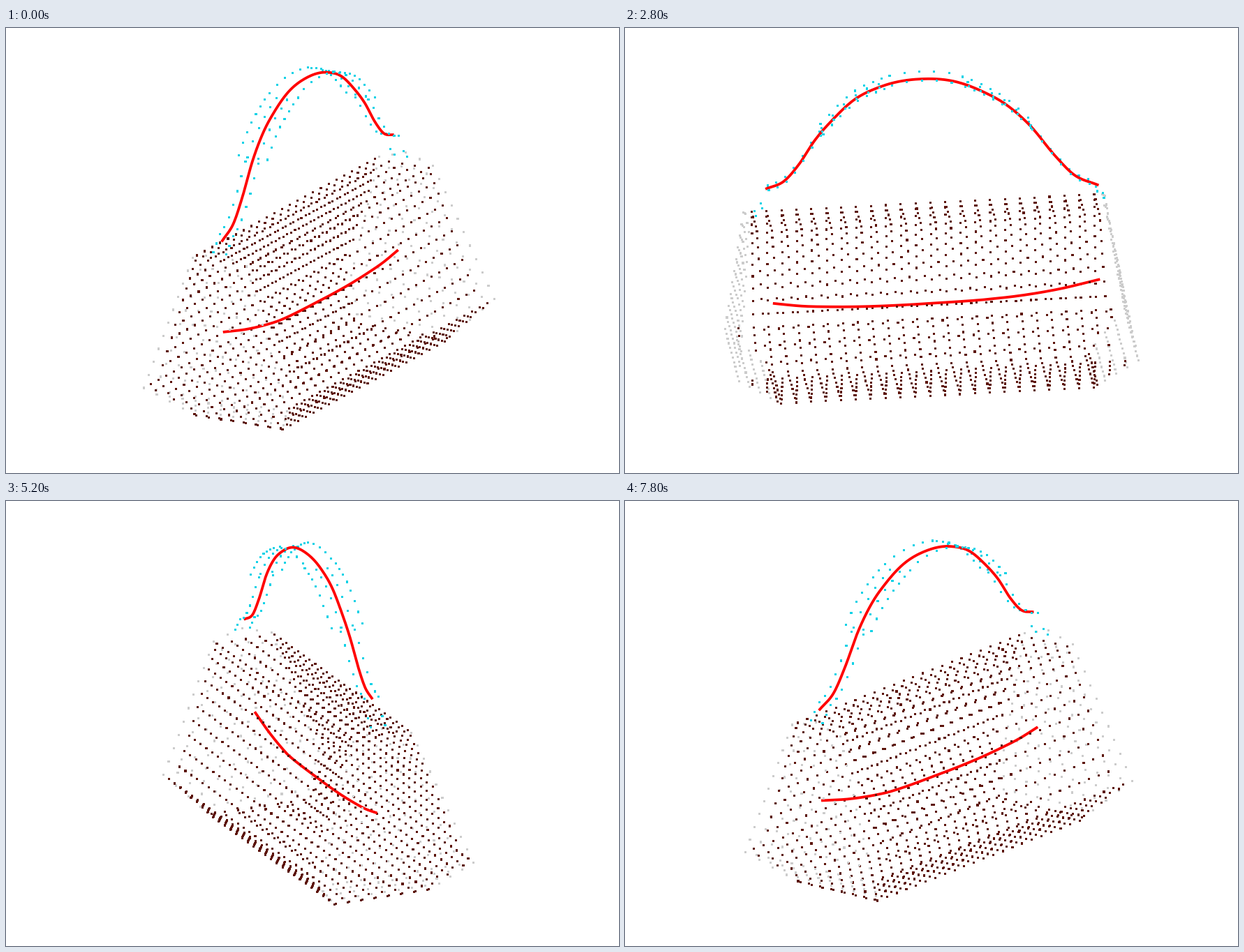
Animation, 878 px wide and 638 px high, one loop 8000 ms. Source, as a matplotlib script:

```python
import numpy as np
import matplotlib.pyplot as plt
from matplotlib.animation import FuncAnimation

W, H, DPI = 878, 638, 100
FRAMES, INTERVAL = 40, 200
START, STEP = 58.8, 9.0            # turntable angle in degrees
TILT, ROLL, LEAN = 0.313, 0.025, 0.047
PITCH = 21.4                       # spacing of the point grid
MID = 6                            # centre of the body along its length
BROWN, GREY, CYAN, RED = "#5c140a", "#cccccc", "#10d2e6", "#ff0000"
PX = 72 / DPI

HANDLE = [(-244, 238), (-208, 220), (-183, 192), (-150, 148), (-115, 114.5),
          (-85, 96), (-48, 80), (5, 73), (60, 80.5), (104, 100), (130, 122),
          (160, 153), (185, 187), (206, 208.5), (234, 219)]
BELLY = [(-239, 370), (-180, 382), (-120, 390), (0, 394.5), (142, 392.5),
         (190, 389), (231, 383)]


def hermite(u, knots):
    """Smooth curve through the knots."""
    x, y = np.array(knots, float).T
    m = np.gradient(y, x)
    i = np.clip(np.searchsorted(x, u) - 1, 0, len(x) - 2)
    d = x[i + 1] - x[i]
    t = np.clip((u - x[i]) / d, 0, 1)
    return ((1 + 2 * t) * (1 - t) ** 2 * y[i] + t * (1 - t) ** 2 * d * m[i]
            + t * t * (3 - 2 * t) * y[i + 1] + t * t * (t - 1) * d * m[i + 1])


def project(p, theta):
    """Points (length, depth, level) to stage pixels."""
    u, v, y = p.T
    c, s = np.cos(theta), np.sin(theta)
    x, back = u * c - v * s, u * s + v * c
    return np.column_stack([W / 2 + x - LEAN * (H / 2 - y),
                            y - ROLL * x - TILT * back])


def body():
    """Long walls, closed top, chamfers and base."""
    pts = []
    rows = (np.arange(12) / 11) ** 1.3
    for s in (np.arange(26) - 12.5) * PITCH:
        u = MID + s
        for side in (-1, 1):
            for t in rows:
                if abs(s) <= 247 or t == 1:
                    pts.append((u, side * (45 + 75 * t), 265 + 189 * t))
            for r in np.arange(1, 6) / 6:
                if abs(s) <= 287 - 62 * r:
                    pts.append((u, side * (120 - 48 * r), 454 + 50 * r))
        if abs(s) <= 247:
            pts += [(u, v, 265) for v in (-22, 0, 22)]
        if abs(s) <= 226:
            pts += [(u, v, 504) for v in np.linspace(-72, 72, 8)]
    return pts


def across(half):
    return np.linspace(-half, half, int(round(2 * half / PITCH)) + 1)


def ends():
    """Both end faces, then the chamfer below them."""
    pts = []
    for side in (-1, 1):
        for t in np.linspace(0, 1, 11):
            half = 45 + 75 * t
            for v in across(half):
                peak = 12 * (1 - abs(v) / half) * (1 - t)
                pts.append((MID + side * (258 + 29 * t), v, 265 + 189 * t - peak))
        for r in (0.25, 0.5, 0.75):
            for v in across(120 - 48 * r):
                pts.append((MID + side * (287 - 62 * r), v, 454 + 50 * r))
    return pts


def end_rims():
    return [(MID + side * 230, v, 501) for side in (-1, 1) for v in across(72)]


def strap():
    pts = []

    def add(us, vs, lift):
        for u in us:
            y = float(hermite(np.array(u), HANDLE)) - lift
            pts.extend((u, v, y) for v in vs)

    add(np.arange(-2, 3) * PITCH + 4, (-22, 22), 4)
    for side in (-1, 1):
        add(side * np.arange(58, 150, 13), (-24, 24), 3)
        add(side * np.arange(64, 150, 17), (-9, 9), 2)
        add(side * np.arange(152, 236, 13), (-11, 11), 0)
        pts.extend((side * u, v, y) for u, y in ((241, 243), (250, 253))
                   for v in (-11, 11))
    return pts


groups = [(ends(), GREY), (body() + end_rims(), BROWN), (strap(), CYAN)]
cloud = np.array([p for pts, _ in groups for p in pts], float)
colors = np.array([c for pts, c in groups for _ in pts])

u1 = np.linspace(-244, 234, 160)
u2 = np.linspace(-239, 231, 160)
curves = [np.column_stack([u1, 0 * u1, hermite(u1, HANDLE)]),
          np.column_stack([u2, 8 * np.clip((-u2 - 100) / 139, 0, 1),
                           hermite(u2, BELLY)])]

# the small margin keeps the pixel size from being rounded down
fig = plt.figure(figsize=((W + 0.1) / DPI, (H + 0.1) / DPI), dpi=DPI,
                 facecolor="white")
ax = fig.add_axes([0, 0, 1, 1])
ax.set_xlim(0, W)
ax.set_ylim(H, 0)
ax.axis("off")


def dots(z):
    return ax.scatter([], [], s=(3.1 * PX) ** 2, marker="s", linewidths=0, zorder=z)


far, near = dots(1), dots(3)
lines = [ax.plot([], [], color=RED, lw=3.8 * PX, solid_capstyle="butt",
                 zorder=2)[0] for _ in curves]


def draw(i):
    theta = np.radians(START + STEP * i)
    xy = project(cloud, theta)
    front = cloud[:, 1] * np.cos(theta) < 0
    for art, mask in ((far, ~front), (near, front)):
        art.set_offsets(xy[mask])
        art.set_facecolor(colors[mask])
    for line, curve in zip(lines, curves):
        line.set_data(*project(curve, theta).T)
    return [far, near, *lines]


anim = FuncAnimation(fig, draw, frames=FRAMES, interval=INTERVAL,
                     repeat=True, repeat_delay=0)
plt.show()
```
